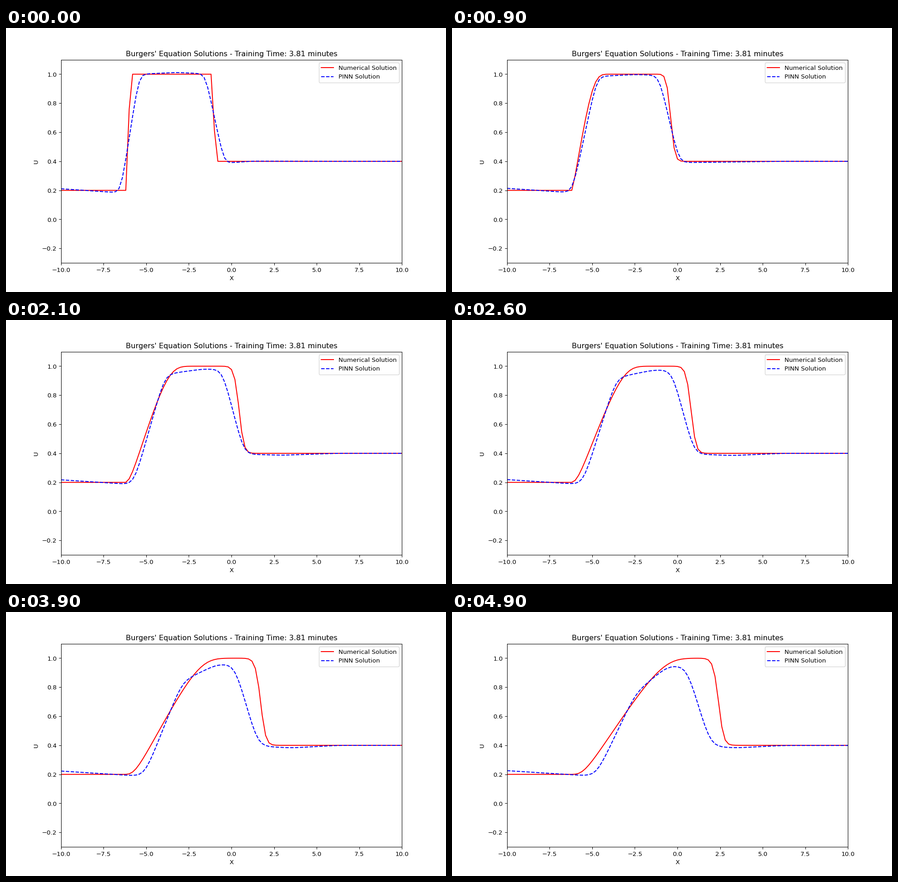
Animation, 966 px wide and 580 px high, one loop 5000 ms. Source, as a matplotlib script:

```python
import numpy as np
import matplotlib.pyplot as plt
from matplotlib.animation import FuncAnimation

WIDTH, HEIGHT, DPI = 966, 580, 96.6
FRAMES, INTERVAL = 50, 100
DX, DT = 0.2, 0.1
x = np.linspace(-10, 10, 101).round(1)


def numerical_solutions():
    """Conservative upwind scheme for u_t + (u^2 / 2)_x = 0."""
    u = np.where(x < -6, 0.2, np.where(x < -1, 1.0, 0.4))
    steps = []
    for _ in range(FRAMES):
        flux = u ** 2 / 2
        u = u.copy()
        u[1:] -= DT / DX * np.diff(flux)
        steps.append(u)
    return steps


def motion(early, middle, late):
    """Parabola in time through three values."""
    return np.poly1d(np.polyfit((0, 21, 49), (early, middle, late), 2))


# Corners of the network's curve: motion of x, motion of u
CORNERS = [
    (motion(-10, -10, -10), motion(.211, .2175, .2255)),         # left edge
    (motion(-6.5, -5.73, -4.78), motion(.183, .185, .187)),      # foot of rise
    (motion(-5.42, -3.9, -2.45), motion(1.0, .945, .765)),       # shoulder
    (motion(-3.2, -1.7, -.6), motion(1.012, .98, .945)),         # crest
    (motion(-1.54, -.53, .55), motion(1.003, .98, .953)),        # start of fall
    (motion(-.43, .72, 1.91), motion(.387, .394, .391)),         # foot of fall
    (motion(1.2, 3.0, 3.4), motion(.401, .387, .382)),           # dip
    (motion(6.2, 6.2, 6.2), motion(.4, .4, .399)),
    (motion(10, 10, 10), motion(.4, .4, .399)),                  # right edge
]
ROUNDING = motion(.11, .165, .22)


def network_solution(frame):
    """Polyline through the corners, each bend softened by a softplus."""
    px, pu = np.array([(a(frame), b(frame)) for a, b in CORNERS]).T
    slopes = np.diff(pu) / np.diff(px)
    w = ROUNDING(frame)
    u = pu[0] + slopes[0] * (x - px[0])
    for corner, bend in zip(px[1:-1], np.diff(slopes)):
        u += bend * w * np.logaddexp(0, (x - corner) / w)
    return u


numerical = numerical_solutions()

# The small margin keeps the pixel size from being rounded down
fig, ax = plt.subplots(figsize=((WIDTH + 1e-3) / DPI, (HEIGHT + 1e-3) / DPI),
                       dpi=DPI)
ax.set(xlim=(-10, 10), ylim=(-0.3, 1.1), xlabel="X", ylabel="U",
       title="Burgers' Equation Solutions - Training Time: 3.81 minutes")
red_line, = ax.plot([], [], "r-", label="Numerical Solution")
blue_line, = ax.plot([], [], "b--", label="PINN Solution")
ax.legend(loc="upper right")


def update(frame):
    red_line.set_data(x, numerical[frame])
    blue_line.set_data(x, network_solution(frame))
    return red_line, blue_line


anim = FuncAnimation(fig, update, frames=FRAMES, interval=INTERVAL,
                     repeat=True, repeat_delay=0)
plt.show()
```
